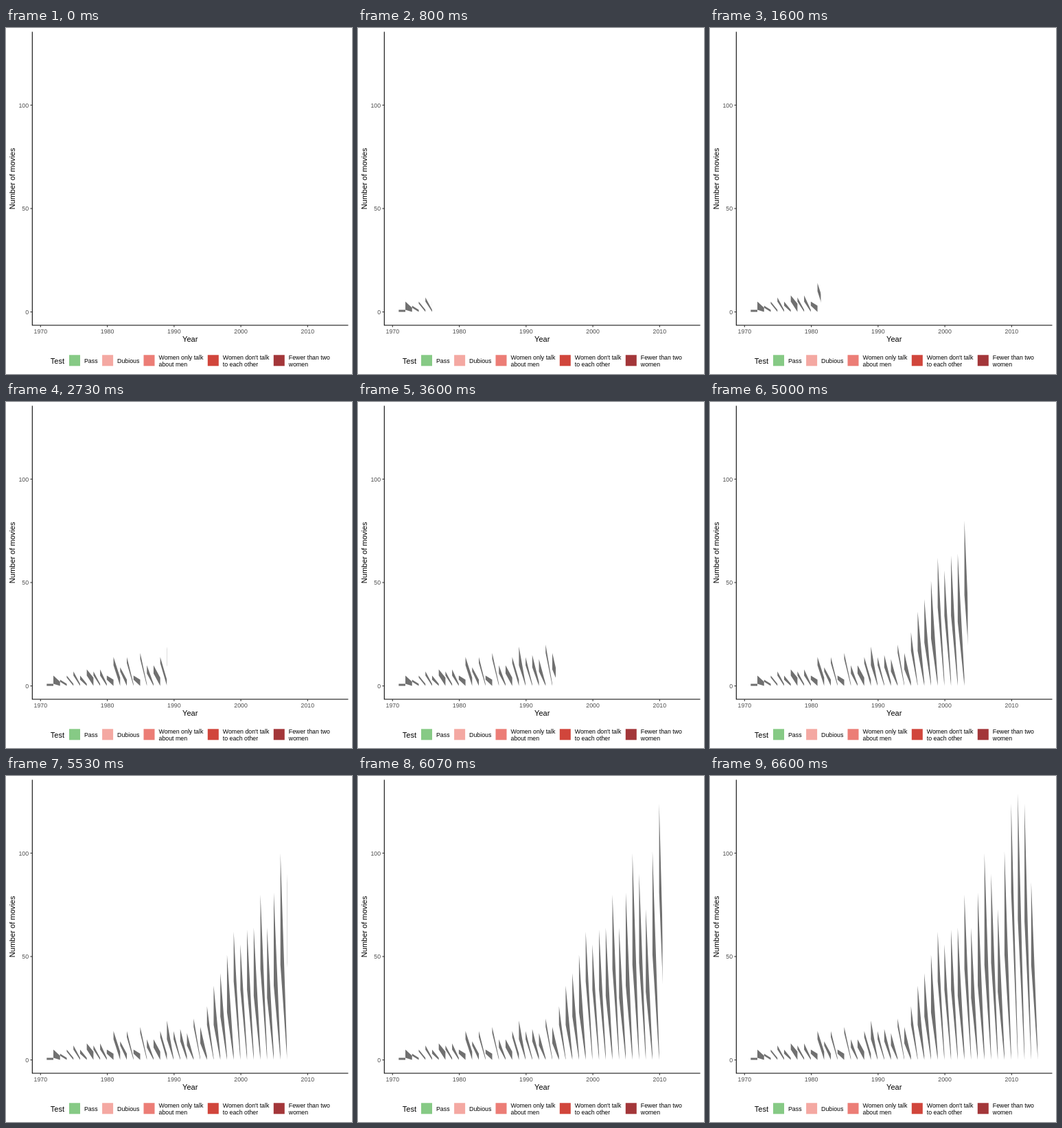
An HTML page for the animation above (6670 ms loop, 504 by 504 pixels).

```html
<!DOCTYPE html>
<html lang="en">
<head>
<meta charset="utf-8">
<title>Number of movies by year</title>
<style>
  html, body { margin: 0; width: 100%; height: 100%; overflow: hidden; background: #fff; }
  svg { display: block; width: 504px; height: 504px; }
  text { font: 8.8px "Liberation Sans", Arial, sans-serif; }
  .title { font-size: 11px; }
  .tick text { fill: #4d4d4d; }
  .tick line { stroke: #333; stroke-width: 1.07; }
  .axis { fill: none; stroke: #000; stroke-width: 1.07; }
  .mid { text-anchor: middle; }
  .end { text-anchor: end; }
</style>
</head>
<body>
<svg viewBox="0 0 504 504">
  <clipPath id="reveal"><rect id="window" x="50" y="0" width="0" height="504"/></clipPath>
  <path id="area" fill="#707070" clip-path="url(#reveal)"/>
  <path class="axis" d="M38.3 5.5V433H498.5"/>
  <g id="ticks" class="tick"></g>
  <text class="title mid" x="268.2" y="457">Year</text>
  <text class="title mid" transform="translate(13.2 219.5) rotate(-90)">Number of movies</text>
  <text class="title" x="64.8" y="489">Test</text>
  <g id="legend"></g>
</svg>
<script>
const LOOP = 6670, FRAMES = 100;
const X0 = 59.3, STEP = 9.727, Y0 = 413.6, UNIT = 3.0126;

// Per year: total, size of the top band, size of the bottom band
const total = [1, 5, 3, 5, 7, 5, 8, 7, 8, 5, 14, 9, 14, 5, 16, 10, 10, 14, 19, 14, 15, 13,
  20, 16, 26, 36, 42, 51, 62, 56, 63, 64, 80, 64, 81, 100, 90, 73, 101, 124, 129, 124, 86, 99];
const top_ = [1, 4, 1, 1, 2, 2, 3, 2, 3, 2, 4, 2, 3, 2, 3, 4, 4, 3, 9, 4, 6, 6,
  4, 8, 9, 19, 21, 28, 24, 22, 29, 33, 36, 34, 45, 54, 43, 40, 50, 43, 61, 57, 40, 46];
const bottom = [1, 1, 2, 1, 1, 1, 1, 4, 1, 1, 3, 4, 3, 1, 3, 1, 1, 4, 3, 1, 1, 2,
  1, 1, 2, 1, 2, 2, 3, 3, 3, 3, 4, 3, 3, 4, 3, 4, 3, 4, 4, 4, 3, 3];
const last = total.length - 1;

const $ = id => document.getElementById(id);
const px = i => X0 + i * STEP;
const py = v => Y0 - v * UNIT;

function add(parent, tag, attrs, text) {
  const el = document.createElementNS("http://www.w3.org/2000/svg", tag);
  for (const key in attrs) el.setAttribute(key, attrs[key]);
  if (text !== undefined) el.textContent = text;
  parent.append(el);
}

// Each sliver falls from the top band of one year to the bottom band of the next
let path = "";
for (let i = 0; i < last; i++) {
  const a = px(i), b = px(i + 1);
  path += `M${a} ${py(total[i])}L${b} ${py(bottom[i + 1])}V${py(0)}L${a} ${py(total[i] - top_[i])}Z`;
}
$("area").setAttribute("d", path);

for (let k = 0; k < 5; k++) {
  const x = 50.3 + k * 10 * STEP;
  add($("ticks"), "line", { x1: x, x2: x, y1: 433, y2: 435.8 });
  add($("ticks"), "text", { x, y: 444.8, class: "mid" }, 1970 + 10 * k);
}
for (const v of [0, 50, 100]) {
  add($("ticks"), "line", { x1: 35.4, x2: 38.2, y1: py(v), y2: py(v) });
  add($("ticks"), "text", { x: 33.1, y: py(v) + 3.2, class: "end" }, v);
}

const keys = [
  [92, "#86ca85", "Pass"],
  [140.1, "#f4a8a2", "Dubious"],
  [200.5, "#ec7d76", "Women only talk", "about men"],
  [293.8, "#d1453b", "Women don't talk", "to each other"],
  [389.8, "#a33639", "Fewer than two", "women"]
];
for (const [x, fill, ...lines] of keys) {
  add($("legend"), "rect", { x, y: 476.3, width: 16, height: 16, fill });
  lines.forEach((line, n) =>
    add($("legend"), "text", { x: x + 22, y: lines.length > 1 ? 483 + 9.7 * n : 487.8 }, line));
}

// Years land on whole frames; the edge moves evenly between them
const arrival = i => Math.round(i * (FRAMES - 1) / last);
function edge(frame) {
  let i = 0;
  while (i < last - 1 && arrival(i + 1) <= frame) i++;
  return px(i + (frame - arrival(i)) / (arrival(i + 1) - arrival(i)));
}

function draw(now) {
  const t = Math.floor((now % LOOP) / 10) * 10;
  const frame = Math.min(FRAMES - 1, Math.floor((t + 3.4) * 0.015));
  $("window").setAttribute("width", frame ? edge(frame) - 50 : 0);
}

const start = performance.now();
function tick() {
  draw(performance.now() - start);
  requestAnimationFrame(tick);
}
tick();
</script>
</body>
</html>
```
